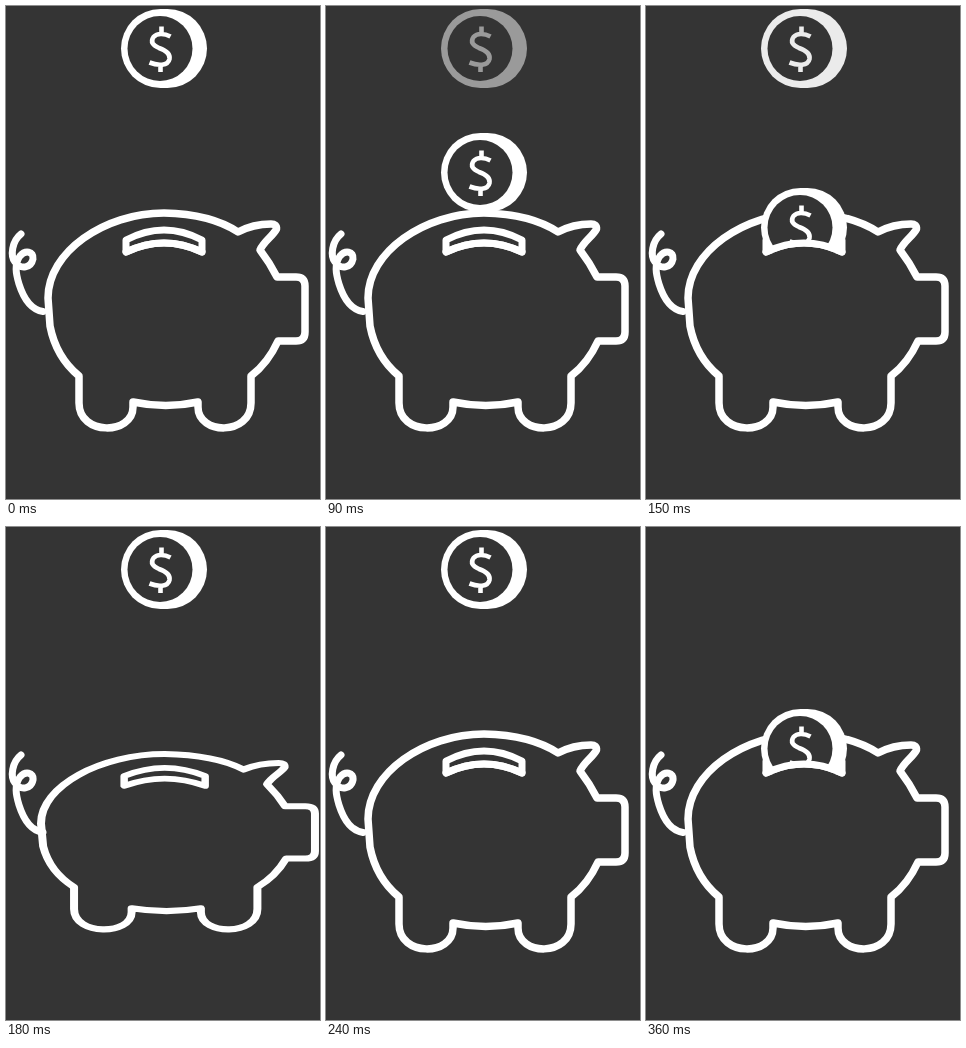
An HTML page that plays this animation: 314x493 px, repeating every 390 ms.

```html
<!DOCTYPE html>
<html lang="en">
<head>
<meta charset="utf-8">
<title>Piggy bank</title>
<style>
  html, body { margin: 0; height: 100%; overflow: hidden; background: #343434; }
  svg { display: block; width: 100%; height: 100%; }
  .line { fill: none; stroke: #fff; stroke-width: 7.5; stroke-linejoin: round; stroke-linecap: round; }
</style>
</head>
<body>
<svg viewBox="0 0 314 493">
  <defs>
    <g id="coin">
      <path fill="#fff" d="M154.5 3H161.5A39.5 39.5 0 0 1 161.5 82H154.5A39.5 39.5 0 0 1 154.5 3Z"/>
      <circle cx="154" cy="42.5" r="32.5" fill="#343434"/>
      <g class="line" style="stroke-width:4.6; stroke-linecap:butt">
        <path d="M164.5 30.5C158 27 151 27 147.500 31C144 36 147 39.500 153 42C160 44.500 164.500 47.500 163.500 53C162 60 152 60 143.500 56.500M155.500 20.500V28M154.500 58V66"/>
      </g>
    </g>
    <clipPath id="aboveSlot"><path d="M0 0H314V246H196Q158 228 120 246H0Z"/></clipPath>
  </defs>

  <path class="line" style="stroke-width:7" d="M15 228C6 235 4 250 9 256C15 264 25 262 27 253C28 245 19 244 14 250C8 258 10 268 13 278C19 297 27 304 37 305.500"/>
  <g id="pig" class="line">
    <path d="M232 226Q205 208 158 207C98 207 42 246 42 292L44 320Q50 351 73 370V397C73 430 127 429 127 401V396Q160 403 192 396V401C192 429 245 430 245 397V370Q262 357 272 335H290Q299 335 299 326V280Q299 271 290 271H271Q264 257 254 244C258 235 267 230 270.500 223Q271 218 265 218Q247 218 232 226Z"/>
    <path style="stroke-width:7" d="M120 234Q158 214 196 234V246Q158 228 120 246Z"/>
  </g>
  <use id="nextCoin" href="#coin"/>
  <g id="falling">
    <g clip-path="url(#aboveSlot)"><use id="fallingCoin" href="#coin"/></g>
    <path class="line" style="stroke-width:7" d="M120 246Q158 228 196 246"/>
  </g>
</svg>
<script>
  const STEP = 30;
  const drops = [0, 48, 95, 124, 153, 179, null, null, 0, 48, 95, 153, 179];
  const squashes = { 6: 1, 7: 0.5 };
  const [pig, nextCoin, falling, fallingCoin] =
    ["pig", "nextCoin", "falling", "fallingCoin"].map(id => document.getElementById(id));

  function draw(time) {
    const step = Math.floor(time / STEP) % drops.length;
    const drop = drops[step];
    const squash = squashes[step] || 0;
    const fade = step < 8 ? Math.min(1, Math.max(0, 0.2 * step - 0.1)) : 0;

    pig.setAttribute("transform",
      `translate(148 316) scale(${1 + 0.066 * squash} ${1 - 0.184 * squash}) translate(-148 -316)`);
    nextCoin.setAttribute("opacity", fade);
    falling.setAttribute("visibility", drop === null ? "hidden" : "visible");
    fallingCoin.setAttribute("y", drop || 0);
  }

  function tick() {
    draw(performance.now());
    requestAnimationFrame(tick);
  }
  tick();
</script>
</body>
</html>
```
